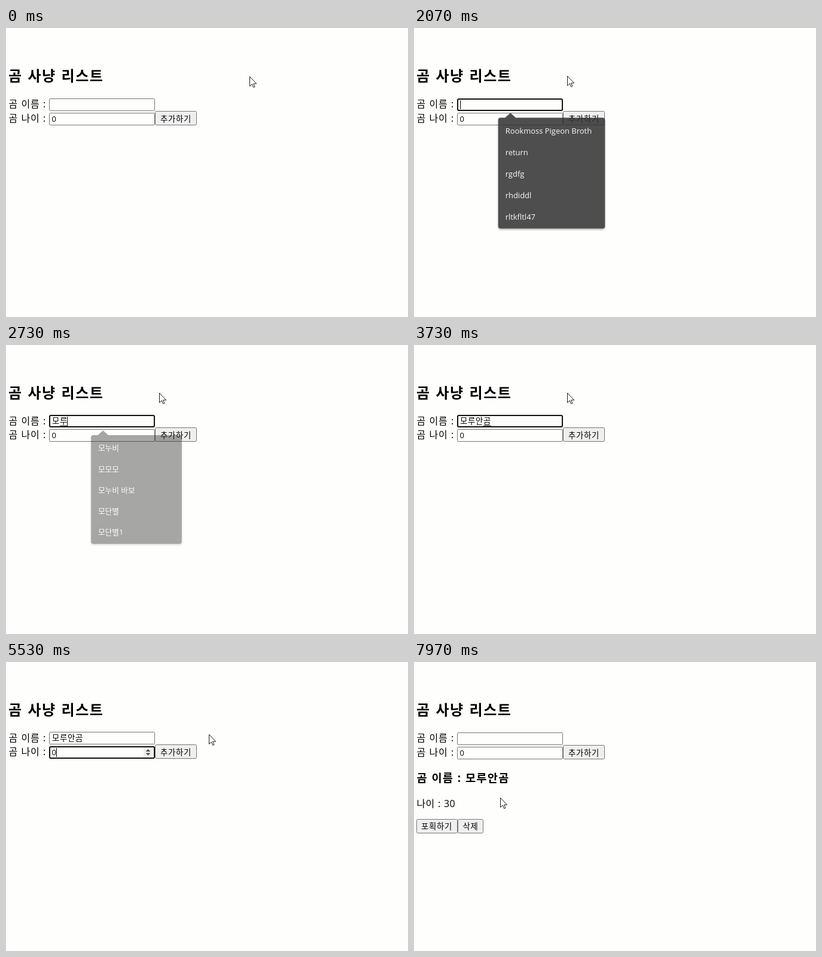
An HTML page for the animation above (8 s loop, 672 px wide and 484 px high).

```html
<!DOCTYPE html>
<html lang="ko">
<head>
<meta charset="utf-8">
<style>
  html, body { margin: 0; width: 100%; height: 100%; overflow: hidden; background: #fefefd; }
  svg { display: block; width: 672px; height: 484px; }
  text { font-family: "Open Sans", "Noto Sans CJK KR", "Noto Sans CJK", sans-serif; fill: #000; white-space: pre; }
  .h2 { font-size: 24px; font-weight: 700; letter-spacing: 1.6px; word-spacing: .9px; }
  .h3 { font-size: 18.72px; font-weight: 700; letter-spacing: 1.2px; word-spacing: .5px; }
  .label { font-size: 16px; letter-spacing: .6px; word-spacing: 1px; }
  .age { font-size: 16px; letter-spacing: .4px; word-spacing: .7px; }
  .small { font-size: 13.33px; letter-spacing: .7px; }
  .digits { font-size: 13px; letter-spacing: -.3px; }
  .item { font-size: 13px; fill: #f8f8f8; }
  .field { fill: #fefefd; stroke: #767676; }
  .field.on { stroke: #101010; stroke-width: 2; }
  .btn { fill: #efefef; stroke: #767676; }
  .btn.hot { fill: #e5e5e5; }
</style>
</head>
<body>
<svg viewBox="0 0 672 484" xmlns="http://www.w3.org/2000/svg">
  <defs>
    <filter id="shade" x="-10%" y="-10%" width="120%" height="120%">
      <feDropShadow dx="0" dy="2" stdDeviation="1.8" flood-color="#000" flood-opacity=".35"/>
    </filter>
  </defs>
  <text class="h2" x="4" y="89">곰 사냥 리스트</text>
  <text class="label" x="4.5" y="133">곰 이름 :</text>
  <g id="nameRow">
    <rect id="nameBox" class="field"/>
    <text id="nameText" class="small" x="77" y="133"></text>
    <rect id="underline" y="136" height="1"/>
  </g>
  <g id="ageRow">
    <text class="label" x="4.5" y="157">곰 나이 :</text>
    <rect id="ageBox" class="field"/>
    <text id="ageText" class="digits" x="76.5" y="157"></text>
    <g id="spinner">
      <rect x="230" y="144" width="15" height="17" fill="#efefef"/>
      <path d="M233.5 151l4-4 4 4zM233.5 153.5l4 4 4-4z" fill="#505050"/>
    </g>
    <rect id="addBtn" class="btn" x="249.5" y="139.5" width="69" height="23" rx="2"/>
    <text class="small" x="258" y="157">추가하기</text>
  </g>
  <rect id="caret" width="1" height="15"/>
  <g id="card">
    <text class="h3" x="4.5" y="201">곰 이름 : 모루안곰</text>
    <text class="age" x="4.5" y="243">나이 : 30</text>
    <rect class="btn" x="4.5" y="263.5" width="68" height="23" rx="2"/>
    <text class="small" x="12" y="280">포획하기</text>
    <rect class="btn" x="73.5" y="263.5" width="42" height="23" rx="2"/>
    <text class="small" x="81.5" y="280">삭제</text>
  </g>
  <g id="popup">
    <path id="bubble" fill="#323232" filter="url(#shade)"/>
    <g id="items"></g>
  </g>
  <path id="arrow" d="M.5 .5V16.500L4.300 13 6.700 18.500 9 17.500 6.600 12.200H11.700Z" fill="#fff" stroke="#1c1c1c"/>
  <path id="beam" d="M-3.500-8.500H-1L0-7.500 1-8.500H3.500M0-7.500V7.500M-3.500 8.500H-1L0 7.500 1 8.500H3.500" fill="none" stroke="#1c1c1c"/>
</svg>
<script>
const LOOP = 8000, BLINK = 500, FADE_OUT = 170;
const FOCUS_NAME = 670, FOCUS_AGE = 4380, ADD = 6850, HANGUL = 2300;
const $ = id => document.getElementById(id);
const clamp = v => Math.max(0, Math.min(1, v));
const ease = v => v * v * (3 - 2 * v);
const show = (el, on) => el.setAttribute("visibility", on ? "visible" : "hidden");
const attrs = (el, o) => { for (const k in o) el.setAttribute(k, o[k]); };
const latest = (list, t) => list.filter(e => e[0] <= t).pop();

// [time, x, y] of the pointer's hot spot
const path = [
  [0, 407, 81], [30, 407, 81], [500, 219, 131], [1100, 219, 131], [1200, 202, 124],
  [1370, 202, 124], [1470, 256, 80], [3870, 256, 80], [4180, 128, 168], [4430, 100, 155],
  [4770, 100, 155], [5000, 439, 130], [5330, 439, 130], [5530, 339, 121],
  [6570, 339, 121], [6780, 291, 149], [6920, 291, 149], [7200, 385, 132],
  [7630, 385, 132], [7860, 112, 222], [7970, 144, 227], [LOOP, 144, 227]
];

const names = [
  [0, ""], [1640, "r"], [2030, ""], [HANGUL, "ㅁ"], [2410, "모"], [2580, "모ㄹ"], [2670, "모루"],
  [2870, "모루ㅇ"], [2950, "모루아"], [3030, "모루안"], [3100, "모루안ㄱ"],
  [3160, "모루안고"], [3230, "모루안곰"], [ADD, ""]
];
const ages = [[0, "0"], [5700, "03"], [5870, "030"], [ADD, "0"]];
const resets = [[FOCUS_NAME], [1640], ...names.slice(3, -1), [FOCUS_AGE], ...ages.slice(1, -1)];

const popups = [
  { at: 670, off: 1640, fade: 100, width: 159,
    items: ["모누비", "모모모", "모단별", "rgdfg", "return", "모누비 바보"] },
  { at: 1640, off: 2060, fade: 50, width: 179,
    items: ["Rookmoss Pigeon Broth", "return", "rgdfg", "rhdiddl", "rltkfltl47"] },
  { at: 2420, off: 2640, fade: 100, width: 155,
    items: ["모누비", "모모모", "모누비 바보", "모단별", "모단별1"] }
];
let shown = null;

function fillPopup(p) {
  if (p === shown) return;
  shown = p;
  const h = p.items.length * 36 + 6, w = p.width;
  $("bubble").setAttribute("d",
    `M144.500 150H152L161 142 170 150H${136.5 + w}q4 0 4 4V${146 + h}q0 4-4 4H144.500q-4 0-4-4V154q0-4 4-4Z`);
  $("items").innerHTML = p.items.map((s, i) =>
    `<text class="item" x="152.5" y="${177 + 36 * i}">${s}</text>`).join("");
}

function drawPopup(t, dy) {
  const p = popups.filter(q => q.at <= t).pop();
  const out = p ? clamp((t - p.off) / FADE_OUT) : 1;
  show($("popup"), out < 1);
  if (out === 1) return;
  fillPopup(p);
  const enter = clamp((t - p.at + 20) / p.fade);
  const scale = 1 - .04 * out - .02 * (1 - enter);
  const cx = 140.5 + p.width / 2, cy = 153 + p.items.length * 18;
  attrs($("popup"), {
    opacity: .92 * enter * (1 - out),
    transform: `translate(${cx} ${cy + dy}) scale(${scale}) translate(${-cx} ${-cy})`
  });
}

function drawField(el, y, on) {
  el.setAttribute("class", on ? "field on" : "field");
  attrs(el, on ? { x: 73, y: y + 1, width: 175, height: 19, rx: 2 }
               : { x: 72.5, y: y + .5, width: 176, height: 20, rx: 1 });
}

function drawPointer(t, dy) {
  const i = path.findIndex(k => k[0] > t);
  const [t0, x0, y0] = path[i - 1], [t1, x1, y1] = path[i];
  const k = ease((t - t0) / (t1 - t0));
  const x = Math.round(x0 + (x1 - x0) * k), y = Math.round(y0 + (y1 - y0) * k);
  const inside = (left, right, top, bottom) =>
    x >= left && x < right && y >= top + dy && y < bottom + dy;
  const inField = inside(72, 249, 118, 139) || inside(72, 249, 142, 163);
  show($("arrow"), !inField);
  show($("beam"), inField);
  $("arrow").setAttribute("transform", `translate(${x} ${y})`);
  $("beam").setAttribute("transform", `translate(${x + .5} ${y + .5})`);
  $("addBtn").setAttribute("class", inside(249, 319, 139, 163) ? "btn hot" : "btn");
}

function drawForm(t, dy) {
  const onName = t >= FOCUS_NAME && t < FOCUS_AGE;
  const onAge = t >= FOCUS_AGE && t < ADD;
  const name = latest(names, t)[1];
  $("nameText").textContent = name;
  $("ageText").textContent = latest(ages, t)[1];
  $("nameRow").setAttribute("transform", `translate(0 ${dy})`);
  $("ageRow").setAttribute("transform", `translate(0 ${dy})`);
  drawField($("nameBox"), 118, onName);
  drawField($("ageBox"), 142, onAge);
  show($("spinner"), onAge);

  const composing = onName && t >= HANGUL;
  show($("underline"), composing);
  if (composing) {
    const step = $("nameText").getComputedTextLength() / name.length;
    attrs($("underline"), { x: 77 + step * (name.length - 1), width: step });
  }

  const last = latest(resets, t);
  const lit = last && Math.floor((t - last[0]) / BLINK) % 2 === 0;
  show($("caret"), lit && (onName || onAge));
  const text = onAge ? $("ageText") : $("nameText");
  const len = text.textContent ? text.getComputedTextLength() : 0;
  attrs($("caret"), { x: Math.round(76.5 + len), y: (onAge ? 145 : 121) + dy });
  show($("card"), t >= ADD);
}

function draw(t) {
  // Hangul in the name field lifts the form by one pixel
  const dy = t >= HANGUL && t < ADD ? -1 : 0;
  drawForm(t, dy);
  drawPopup(t, dy);
  drawPointer(t, dy);
}

const start = performance.now();
function tick() {
  draw((performance.now() - start) % LOOP);
  requestAnimationFrame(tick);
}
draw(0);
requestAnimationFrame(tick);
</script>
</body>
</html>
```
